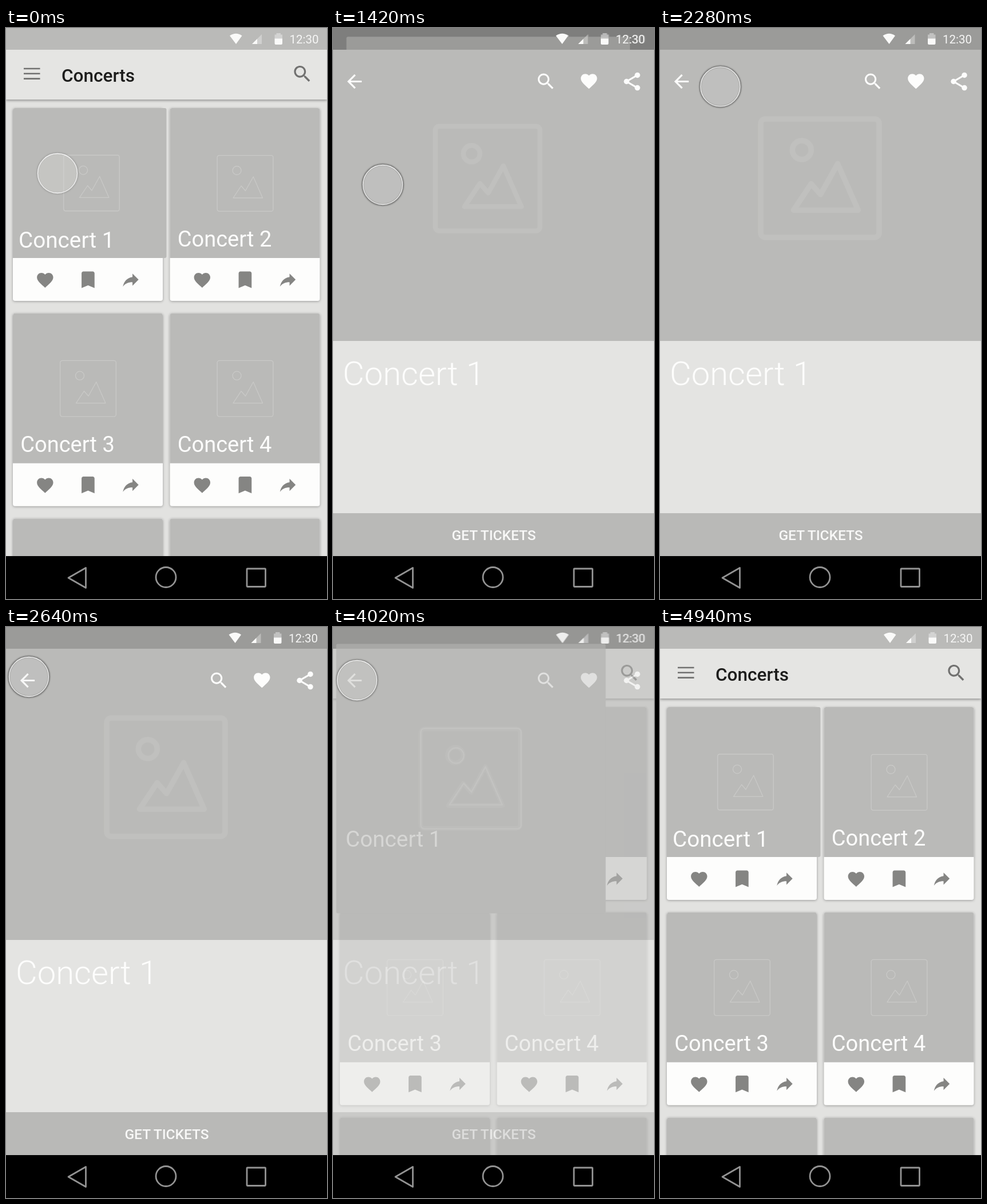
These frames come from a looping animation (561x998 px, 5020 ms). An HTML page:

```html
<!DOCTYPE html>
<html lang="en">
<head>
<meta charset="utf-8">
<title>Concerts</title>
<style>
  html, body { margin: 0; width: 100%; height: 100%; overflow: hidden; background: #e2e2e0; }
  svg { display: block; width: 561px; height: 998px; font-family: Roboto, "Open Sans", sans-serif; }
  .card { filter: drop-shadow(0 1px 2px rgba(0, 0, 0, .32)); }
  .bar { filter: drop-shadow(0 2px 2px rgba(0, 0, 0, .34)); }
  .pic { fill: none; stroke-linejoin: round; }
</style>
</head>
<body>
<svg id="stage" viewBox="0 0 561 998"></svg>
<script>
const LOOP = 5020;
const GREY = '#babab8', PALE = '#e5e5e3', WHITE = '#fdfdfc', ICON = '#858583', DARK = '#717170';

const glyphs = {
  heart: '<path d="M12 21.35l-1.45-1.32C5.4 15.36 2 12.28 2 8.5 2 5.42 4.42 3 7.5 3c1.74 0 3.41.81 4.5 2.09C13.09 3.81 14.76 3 16.5 3 19.58 3 22 5.42 22 8.5c0 3.78-3.4 6.86-8.55 11.54z"/>',
  bookmark: '<path d="M17 3H7c-1.1 0-2 .9-2 2v16l7-3 7 3V5c0-1.1-.9-2-2-2z"/>',
  forward: '<path d="M14 9V5l7 7-7 7v-4.1c-5 0-8.5 1.6-11 5.1 1-5 4-10 11-11z"/>',
  search: '<path d="M15.5 14h-.79l-.28-.27C15.41 12.59 16 11.11 16 9.5 16 5.91 13.09 3 9.5 3S3 5.91 3 9.5 5.91 16 9.5 16c1.61 0 3.09-.59 4.23-1.57l.27.28v.79l5 4.99L20.49 19zm-6 0C7.01 14 5 11.99 5 9.5S7.01 5 9.5 5 14 7.01 14 9.5 11.99 14 9.5 14z"/>',
  back: '<path d="M20 11H7.83l5.59-5.59L12 4l-8 8 8 8 1.41-1.41L7.83 13H20z"/>',
  share: '<path d="M18 5L6 12l12 7" fill="none" stroke="#fdfdfc" stroke-width="2"/><circle cx="18" cy="5" r="3"/><circle cx="6" cy="12" r="3"/><circle cx="18" cy="19" r="3"/>'
};

const icon = (name, x, y, scale, fill) =>
  `<g fill="${fill}" transform="translate(${x} ${y}) scale(${scale}) translate(-12 -12)">${glyphs[name]}</g>`;
const rect = (x, y, w, h, fill, more = '') =>
  `<rect x="${x}" y="${y}" width="${w}" height="${h}" fill="${fill}" ${more}/>`;
const text = (str, x, y, size, fill = WHITE, more = '') =>
  `<text x="${x}" y="${y}" font-size="${size}" fill="${fill}" ${more}>${str}</text>`;

// Image placeholder on a 99-unit square
const picture = (colour, width) => `<g class="pic" stroke="${colour}" stroke-width="${width}">
  <rect x="${width / 2}" y="${width / 2}" width="${99 - width}" height="${99 - width}" rx="3.5"/>
  <circle cx="35" cy="27" r="7.5"/><path d="M28.5 75L42.5 54L50 62.5L63.7 38L80 75z"/></g>`;

const card = (x, y, title) => `<g class="card" transform="translate(${x} ${y})">
  ${rect(0, 0, 262, 337, WHITE, 'rx="4"')}
  <path d="M0 262V4q0-4 4-4h254q4 0 4 4v258z" fill="${GREY}"/>
  </g><g transform="translate(${x} ${y})">
  <g transform="translate(82 82)">${picture('#c9c9c7', 1.3)}</g>
  ${text(title, 13.3, 242, 38)}
  ${icon('heart', 56.3, 300.7, 1.42, ICON)}
  ${icon('bookmark', 131.4, 300, 1.62, ICON)}
  ${icon('forward', 206, 299.8, 1.52, ICON)}</g>`;

const status = dx => `<g transform="translate(${dx} 0)" fill="#fafaf9">
  <path d="M391 13.5Q402 6 412.500 13.500L402 28z"/>
  <path d="M430 28L447 11V28z" opacity=".35"/><path d="M430 28L439 19V28z"/>
  <path d="M469.500 11.500h3V9h7.500v2.500h3V19h-13.500z" opacity=".4"/>
  <path d="M469.500 18.500H483V27q0 2-2 2h-9.500q-2 0-2-2z"/>
  ${text('12:30', 495.5, 26.5, 20.5, '#f6f6f5')}</g>`;

const list = `${rect(0, 0, 561, 998, '#e2e2e0')}
  ${card(12, 140, '')}${card(286.5, 140, 'Concert 2')}
  ${card(12, 498.700, 'Concert 3')}${card(286.5, 498.700, 'Concert 4')}
  ${card(12, 857.400, '')}${card(286.5, 857.400, '')}
  <g class="bar">${rect(0, 38, 561, 87, PALE)}</g>
  ${rect(0, 0, 561, 38, GREY)}${status(0)}
  <path d="M31 71h28.500M31 79.800h28.500M31 88.600h28.500" stroke="${DARK}" stroke-width="2.6"/>
  ${text('Concerts', 97, 93.5, 31.5, '#1d1d1c', 'font-weight="500"')}
  ${icon('search', 517.8, 80.3, 1.6, DARK)}`;

const detail = `${rect(0, 0, 561, 38, '#000', 'opacity=".17"')}
  ${rect(0, 38, 561, 509, GREY)}
  <g id="bold">${picture('#c0c0be', 4.4)}</g>
  ${rect(0, 547, 561, 301, '#e4e4e2')}
  ${rect(0, 848, 561, 75, '#b9b9b7')}
  ${status(-1.5)}
  ${icon('back', 37.5, 93.5, 1.58, WHITE)}
  ${icon('search', 372, 93.5, 1.56, WHITE)}
  ${icon('heart', 447.3, 93, 1.42, WHITE)}
  ${icon('share', 522.5, 93.5, 1.58, WHITE)}
  ${text('Concert 1', 17, 624, 58, WHITE, 'font-weight="300"')}
  ${text('GET TICKETS', 281, 895, 24.5, '#f8f8f7', 'font-weight="500" text-anchor="middle"')}`;

const nav = `${rect(0, 923, 561, 75, '#000')}
  <g fill="none" stroke="#939393" stroke-width="2.8" stroke-linejoin="round">
  <path d="M109 961L139.500 943.500V978.500z"/><circle cx="279.5" cy="960" r="17.5"/>
  <rect x="421" y="945" width="32.5" height="31.5" rx="1"/></g>`;

const stage = document.getElementById('stage');
stage.innerHTML = `<defs><filter id="soft" x="-30%" y="-30%" width="160%" height="160%">
    <feGaussianBlur stdDeviation="1.3"/></filter></defs>
  ${list}
  ${rect(0, 0, 561, 38, '#000', 'id="shade"')}
  ${rect(0, 0, 0, 0, GREY, 'id="hero" rx="3"')}
  <g id="thin">${picture('#c9c9c7', 1.3)}</g>
  ${text('Concert 1', 22, 384, 38.7)}
  <g id="detail">${detail}</g>${nav}
  <g id="touch">
    <circle id="glow" r="35.5" fill="none" stroke="#000" stroke-width="3" filter="url(#soft)"/>
    <circle id="disc" r="34.5" fill="#d8d8d6" stroke="none"/>
    <circle r="34.5" fill="none" stroke="#fff" stroke-width="1.3" stroke-opacity=".9"/>
  </g>`;

const el = {};
for (const id of ['shade', 'hero', 'thin', 'bold', 'detail', 'touch', 'glow', 'disc'])
  el[id] = document.getElementById(id);
const set = (node, attrs) => {
  for (const key in attrs) node.setAttribute(key, attrs[key]);
};

const ramp = (t, a, b) => Math.min(1, Math.max(0, (t - a) / (b - a)));
const out = (u, power) => 1 - (1 - u) ** power;
const mix = (a, b, u) => a + (b - a) * u;

// Finger path: time, x, y
const path = [
  [0, 90, 254], [460, 87, 272], [560, 87, 272], [1040, 87, 274], [1680, 87, 274],
  [2000, 139, 163], [2200, 121, 111], [2640, 40, 87], [3300, 40, 87],
  [3360, 41, 91], [3500, 41, 91], [3680, 42, 93], [LOOP, 42, 93]
];

function slope(i, axis) {
  const a = path[i - 1], p = path[i], b = path[i + 1];
  if (!a || !b || (a[1] === p[1] && a[2] === p[2]) || (b[1] === p[1] && b[2] === p[2])) return 0;
  return (b[axis] - a[axis]) / (b[0] - a[0]);
}

function finger(t, axis) {
  const i = path.findIndex(p => p[0] > t) - 1;
  const a = path[i], b = path[i + 1], span = b[0] - a[0], u = (t - a[0]) / span;
  const s = u * u * (3 - 2 * u);
  return mix(a[axis], b[axis], s)
    + span * u * (1 - u) * ((1 - u) * slope(i, axis) - u * slope(i + 1, axis));
}

function placePicture(node, x, y, size) {
  set(node, { transform: `translate(${x - size / 2} ${y - size / 2}) scale(${size / 99})` });
}

function draw(t) {
  const opening = ramp(t, 1090, 1620), closing = ramp(t, 3970, 4480);
  const rest = 1 - out(closing, 3.4);
  const move = out(opening, 2.7) * rest, grow = out(opening, 1.55) * rest;
  const x = mix(149.5, 280.5, move), y = mix(271, 262.5, move), size = mix(262, 561, grow);
  const shown = ramp(t, 1090, 1320) * (1 - ramp(t, 3970, 4090));

  set(el.hero, { x: x - size / 2, y: y - size / 2, width: size, height: size });
  placePicture(el.thin, x, y, size * .377);
  placePicture(el.bold, x - move, y, size * .386);
  set(el.shade, { opacity: .19 * shown });
  set(el.detail, { opacity: shown });
  set(el.touch, {
    transform: `translate(${finger(t, 1)} ${finger(t, 2)})`,
    opacity: 1 - ramp(t, 4260, 4460)
  });
  set(el.glow, { opacity: mix(.1, .38, shown) });
  set(el.disc, { opacity: mix(.34, .16, shown) });
}

const start = performance.now();
function tick() {
  draw((performance.now() - start) % LOOP);
  requestAnimationFrame(tick);
}
tick();
</script>
</body>
</html>
```
